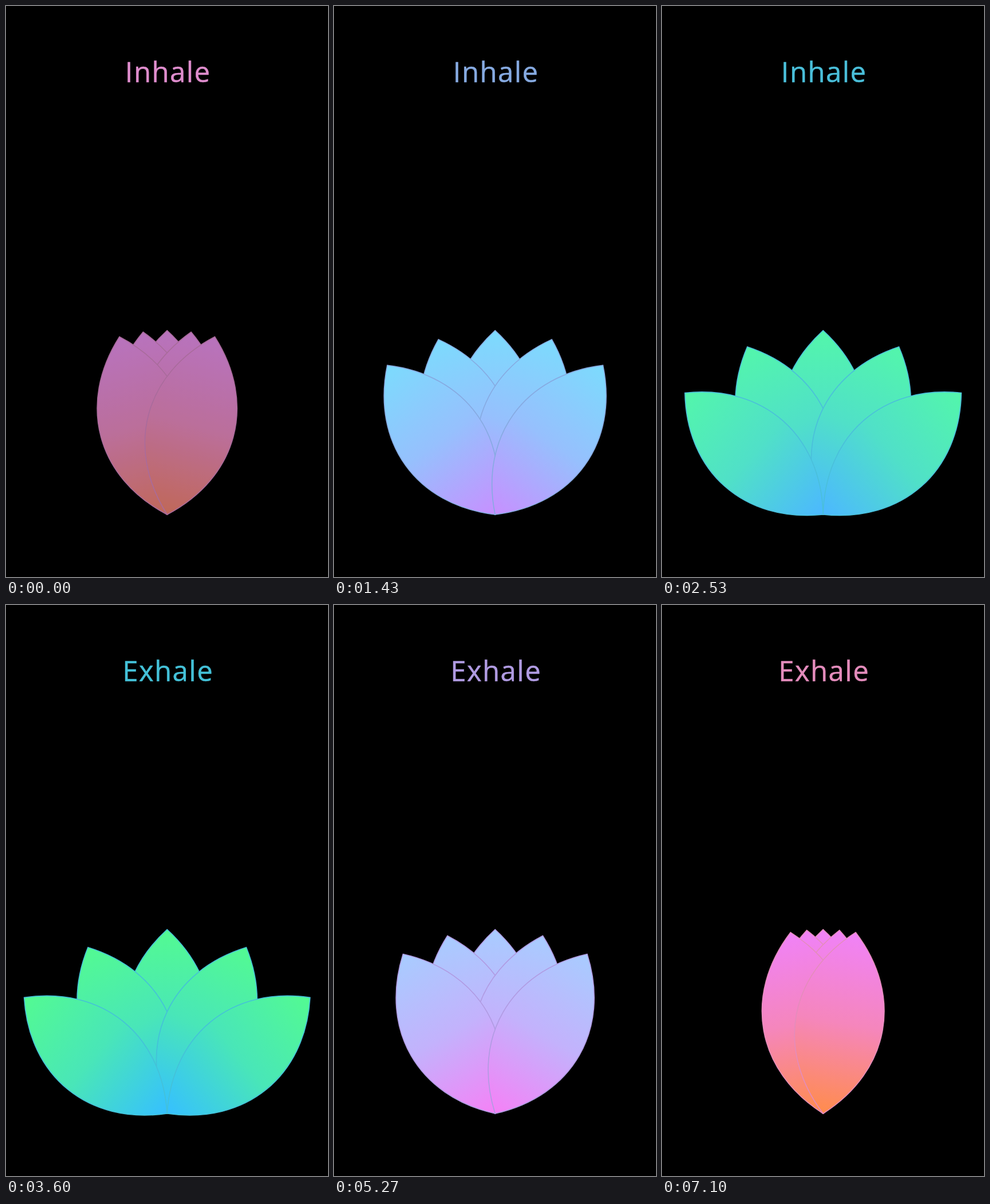
An HTML page that plays this animation: 562 by 997 pixels, repeating every 7130 ms.

```html
<!DOCTYPE html>
<html lang="en">
<head>
<meta charset="utf-8">
<title>Breathing lotus</title>
<style>
  html, body { margin: 0; width: 100%; height: 100%; overflow: hidden; background: #000; }
  svg { display: block; width: 100%; height: 100%; }
  text { font: 49px "Open Sans", "Noto Sans", sans-serif; letter-spacing: .03em; text-anchor: middle; }
</style>
</head>
<body>
<svg viewBox="0 0 562 997">
  <defs>
    <linearGradient id="tint" gradientUnits="userSpaceOnUse" x1="0" y1="0" x2="0" y2="-322">
      <stop offset="0"/><stop offset=".5"/><stop offset="1"/>
    </linearGradient>
    <path id="petal" d="M0 0C102 -94 102 -228 0 -321.5C-102 -228 -102 -94 0 0Z"/>
  </defs>
  <text id="label" x="282.7" y="133" stroke-width=".5" stroke-linejoin="round"></text>
  <g id="flower" transform="translate(281.2 888)" fill="url(#tint)" stroke-width="1.6"></g>
</svg>
<script>
const LOOP = 7130, TURN = 3210;
const CLOSED = 10.1, OPEN = 51.9;
const label = document.getElementById('label');
const flower = document.getElementById('flower');
const stops = document.querySelectorAll('#tint stop');

// Back to front; each petal leans by its share of the opening angle.
const petals = [0, -.5, .5, -1, 1].map(share => {
  const node = document.createElementNS('http://www.w3.org/2000/svg', 'use');
  node.setAttribute('href', '#petal');
  flower.append(node);
  return { node, share };
});

// Evenly spaced colours from closed to open.
const BASE = [[255, 140, 75], [245, 128, 255], [45, 195, 255]];
const TIP = [[240, 130, 248], [245, 175, 252], [160, 207, 255], [82, 232, 250], [83, 252, 135]];
const LINE = [[228, 140, 188], [218, 143, 225], [172, 156, 226], [90, 186, 224], [66, 194, 215]];

const mix = (a, b, k) => a.map((v, i) => v + (b[i] - v) * k);
const rgb = color => `rgb(${color.map(Math.round)})`;

function ramp(colors, x) {
  const pos = x * (colors.length - 1);
  const i = Math.min(Math.floor(pos), colors.length - 2);
  return mix(colors[i], colors[i + 1], pos - i);
}

// 0 is closed, 1 is open. The loop begins partway into the inhale.
function openness(t) {
  const left = 1 - t / TURN;
  const phase = left > 0
    ? 140 * left + 3 * Math.sin(2 * Math.PI * left)
    : .045 * (t - TURN);
  return (1 + Math.cos(phase * Math.PI / 180)) / 2;
}

function render(t) {
  const open = openness(t);
  const angle = CLOSED + (OPEN - CLOSED) * open;
  const base = ramp(BASE, open), tip = ramp(TIP, open);
  const line = rgb(ramp(LINE, open));

  petals.forEach(({ node, share }) => node.setAttribute('transform', `rotate(${share * angle})`));
  [0, .65, 1].forEach((k, i) => stops[i].setAttribute('stop-color', rgb(mix(base, tip, k))));
  flower.setAttribute('stroke', line);
  flower.setAttribute('opacity', Math.min(1, .76 + .24 * t / 900));

  label.textContent = t < TURN ? 'Inhale' : 'Exhale';
  label.setAttribute('fill', line);
  label.setAttribute('stroke', line);
}

const start = performance.now();
function tick() {
  render((performance.now() - start) % LOOP);
  requestAnimationFrame(tick);
}
tick();
</script>
</body>
</html>
```
